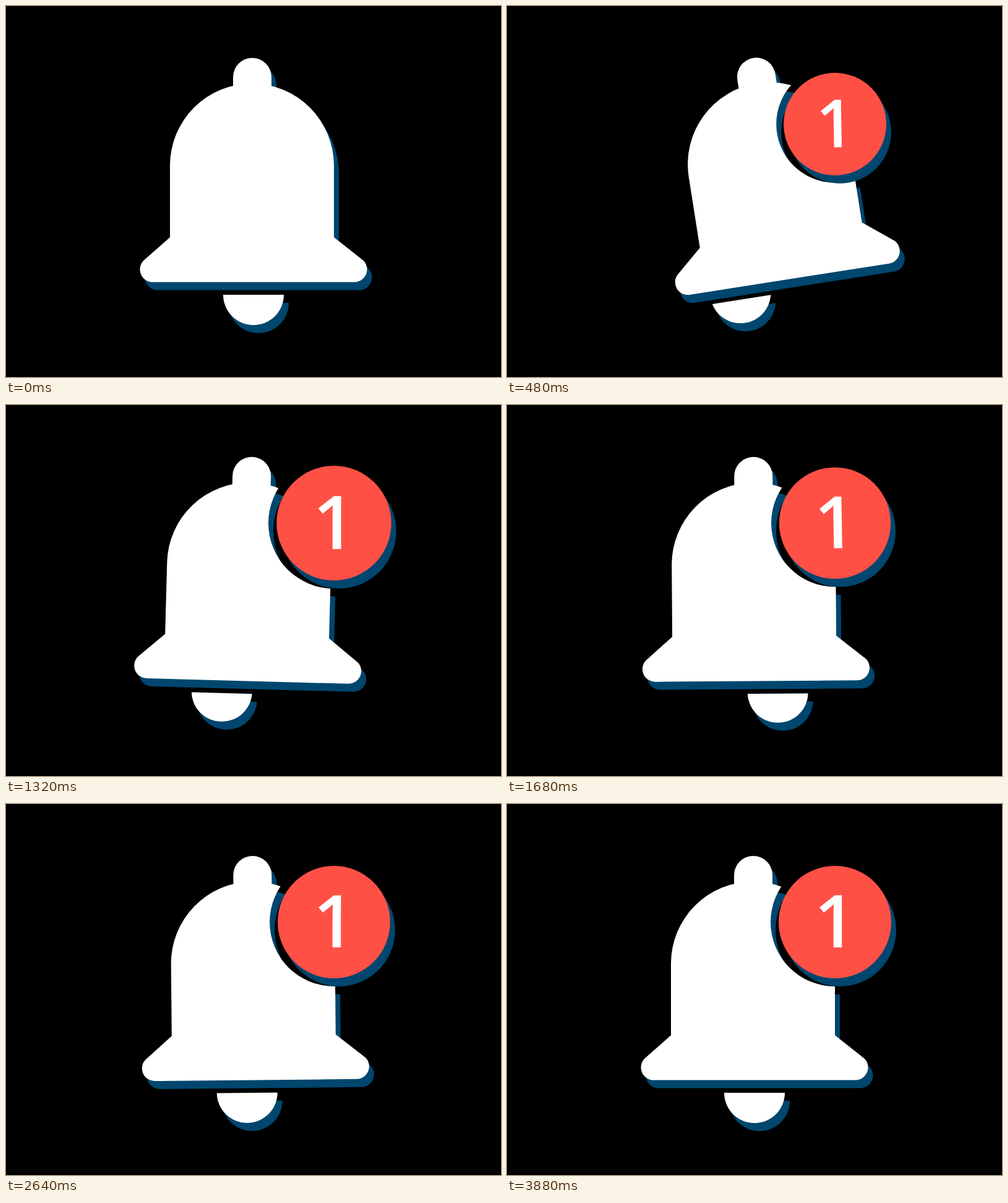
An HTML page for the animation above (5000 ms loop, 800 px wide and 600 px high).

```html
<!DOCTYPE html>
<html lang="en">
<head>
<meta charset="utf-8">
<title>Notification bell</title>
<style>
  html, body { margin: 0; width: 100%; height: 100%; overflow: hidden; background: #000; }
  svg { display: block; width: 100%; height: 100%; }
  .shadow { filter: drop-shadow(8px 13px 0 #00466e); }
  text { font: 600 118px "Open Sans", "Noto Sans", sans-serif; text-anchor: middle; }
</style>
</head>
<body>
<svg viewBox="0 0 800 600">
  <defs>
    <mask id="cut" maskUnits="userSpaceOnUse" x="0" y="0" width="800" height="600">
      <rect width="800" height="600" fill="#fff"/>
      <circle id="hole" cx="530" cy="191" r="0" fill="#000"/>
    </mask>
    <clipPath id="below"><rect x="150" y="467" width="500" height="100"/></clipPath>
  </defs>
  <g class="shadow" fill="#fff">
    <g mask="url(#cut)">
      <g class="swing">
        <path d="M367 140V115A31 31 0 0 1 429 115V140Z"/>
        <path d="M265 374V258A132.5 132.5 0 0 1 530 258V374L578 412A20.5 20.5 0 0 1 563.5 446.5H237A20.5 20.5 0 0 1 222 412Z"/>
      </g>
    </g>
    <g class="swing">
      <g clip-path="url(#below)"><circle id="clapper" cx="400" cy="467" r="49"/></g>
    </g>
  </g>
  <g class="shadow">
    <g id="badge">
      <circle r="91" fill="#ff5046"/>
      <text id="digit" y="41" fill="#fff">1</text>
    </g>
  </g>
</svg>
<script>
  const LOOP = 5000, STEP = 40, REST = 3880;
  const $ = id => document.getElementById(id);
  const swings = document.querySelectorAll('.swing');
  const hole = $('hole'), clapper = $('clapper'), badge = $('badge'), digit = $('digit');

  // Eased move from a to b; endSlope is the speed left over at the end
  function ease(t, t0, t1, a, b, endSlope = 0) {
    const u = Math.min(1, Math.max(0, (t - t0) / (t1 - t0)));
    const s = u * u * (3 - 2 * u);
    return a + (b - a) * s + endSlope * (t1 - t0) * (u * u * u - u * u);
  }

  // Damped sine; keep is the share of amplitude left after one period
  function wave(t, period, keep) {
    return Math.pow(keep, t / period) * Math.sin(2 * Math.PI * t / period);
  }

  function bellAngle(t) {
    if (t < 360) return ease(t, 20, 360, 0, -20);
    if (t < 680) return ease(t, 360, 680, -20, 15);
    if (t < 905) return ease(t, 680, 905, 15, 0, -0.08);
    return t < 3400 ? -10.6 * wave(t - 905, 758, 0.28) : 0;
  }

  function clapperShift(t) {
    if (t < 440) return ease(t, 40, 440, 0, -88);
    if (t < 760) return ease(t, 440, 760, -88, 63);
    if (t < 994) return ease(t, 760, 994, 63, 0, -1.13);
    const fade = Math.max(0, Math.min(1, (REST - t) / 480));
    return -138 * fade * wave(t - 994, 765, 0.38);
  }

  function badgeScale(t) {
    if (t < 520) return ease(t, 230, 520, 0, 1, 0.00123);
    return t < 2800 ? 1 + 0.133 * wave(t - 520, 725, 0.27) : 1;
  }

  function digitAngle(t) {
    if (t < 470) return ease(t, 230, 470, 20, 0, -0.094);
    return t < 2800 ? -12.7 * wave(t - 470, 850, 0.28) : 0;
  }

  function draw(t) {
    const dx = clapperShift(t), scale = badgeScale(t);
    swings.forEach(g => g.setAttribute('transform', `rotate(${bellAngle(t)} 398 83)`));
    clapper.setAttribute('cx', 400 + dx);
    clapper.setAttribute('cy', 467 - dx * dx / 620);
    hole.setAttribute('r', 104 * scale);
    badge.setAttribute('transform', `translate(530 191) scale(${scale})`);
    badge.setAttribute('visibility', scale > 0 ? 'visible' : 'hidden');
    digit.setAttribute('transform', `rotate(${digitAngle(t)})`);
  }

  const start = performance.now();
  function tick() {
    const t = (performance.now() - start) % LOOP;
    draw(Math.floor(t / STEP) * STEP);
    requestAnimationFrame(tick);
  }
  tick();
</script>
</body>
</html>
```
